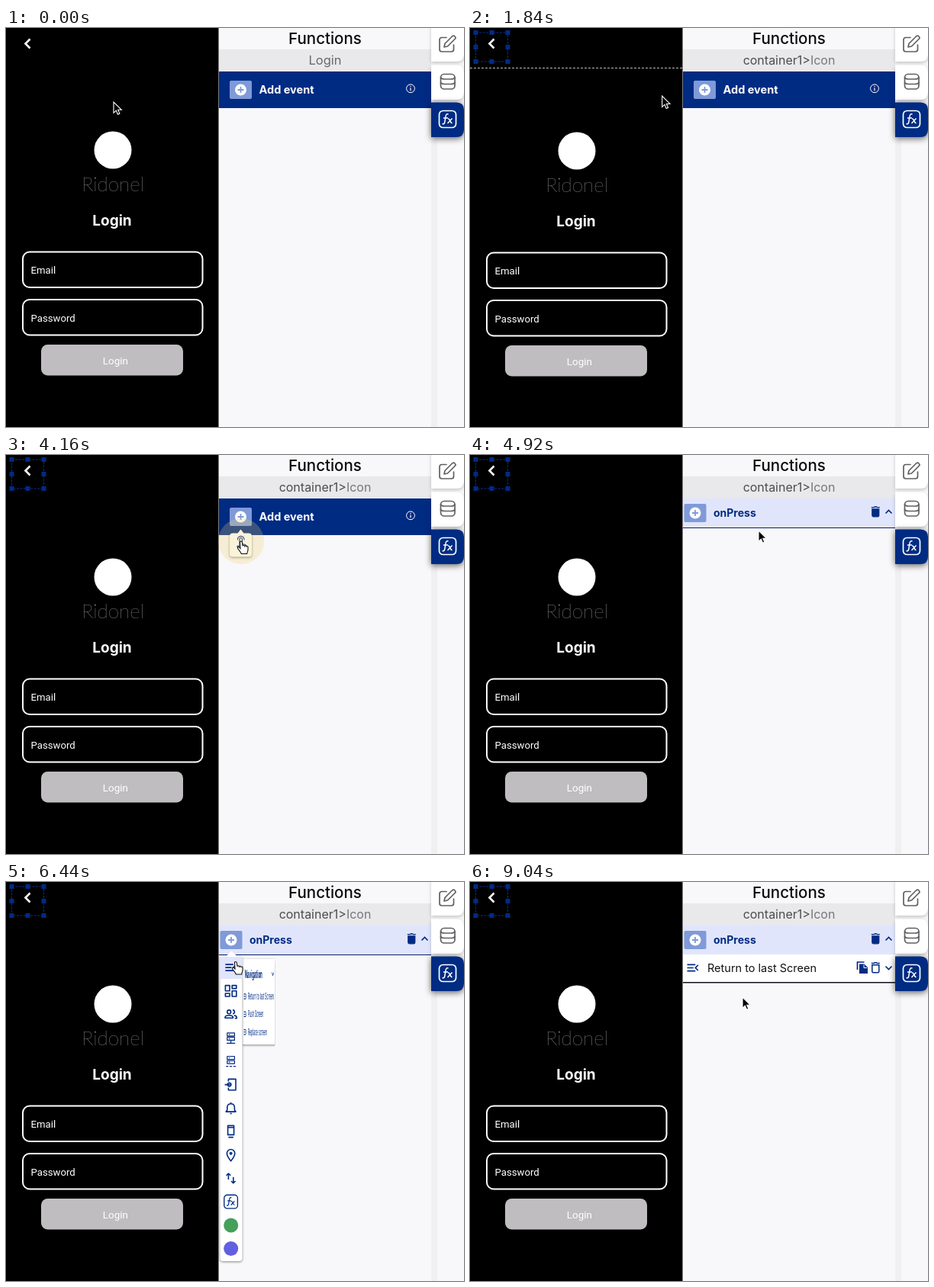
These frames come from a looping animation (600 by 523 pixels, 9800 ms). An HTML page:

```html
<!DOCTYPE html>
<html lang="en">
<head>
<meta charset="utf-8">
<title>Adding an event</title>
<style>
html, body { margin: 0; width: 100%; height: 100%; overflow: hidden; background: #f8f7f9; }
svg { display: block; }
text { font-family: Inter, "Open Sans", sans-serif; }
.app { font-family: Roboto, Arial, sans-serif; fill: #fff; }
.mid { text-anchor: middle; }
.navy { fill: #002b83; }
.line { fill: none; stroke: #002b83; stroke-width: 2; stroke-linejoin: round; }
.thin { stroke-width: 1.500; }
.chev { fill: none; stroke: #002b83; stroke-width: 1.700; }
.tab { fill: #fff; filter: drop-shadow(0 2px 2px #0003); }
.card { fill: #fff; filter: drop-shadow(0 1px 1.5px #0007); }
.tool { fill: none; stroke: #606064; stroke-width: 1.700; stroke-linejoin: round; stroke-linecap: round; }
</style>
</head>
<body>
<svg width="600" height="523" viewBox="0 0 600 523">
  <defs>
    <g id="open"><path class="navy" d="M3 18h13v-2H3v2zm0-5h10v-2H3v2zm0-7v2h13V6H3zm18 9.600L17.400 12 21 8.400 19.600 7l-5 5 5 5z"/></g>
    <g id="grid" class="line"><path d="M3 3h7v9H3zM14 3h7v5h-7zM14 12h7v9h-7zM3 16h7v5H3z"/></g>
    <g id="people" class="line"><circle cx="9" cy="8" r="3"/><path d="M2.500 18v-1c0-2 3-3.500 6.500-3.500s6.500 1.500 6.500 3.500v1zM15 5a3 3 0 0 1 0 6M17.500 13.700c2.500.5 4 1.800 4 3.300v1.500h-3"/></g>
    <g id="server" class="line thin"><path d="M6 4h12v5H6zM6 11h12v5H6zM12 16v5M5 21h14M8.500 6.500h2M8.500 13.500h2"/></g>
    <g id="query" class="line thin"><path d="M6 4h12v5H6zM6 11h12v5H6zM8.500 6.500h2M8.500 13.500h2"/><path d="M4 20.500h17" stroke-dasharray="4 2"/></g>
    <g id="exit" class="line"><path d="M8 7V3h12v18H8v-4M2 12h9"/><circle cx="9.500" cy="12" r="2.800"/></g>
    <g id="bell" class="line"><path d="M4 18h16l-2-2.500V11c0-3.500-2-6-6-6s-6 2.500-6 6v4.500zM12 5V2.500M10.500 21h3"/></g>
    <g id="phone" class="line"><path d="M7 2.500h10v15H7zM7 5.500h10M8 21.500h8"/></g>
    <g id="pin" class="line"><path d="M12 22c-4-5-6.500-8.500-6.500-12.500a6.500 6.500 0 0 1 13 0c0 4-2.500 7.500-6.500 12.500z"/><circle cx="12" cy="9.500" r="1.500"/></g>
    <g id="swap" class="line"><path d="M8 14V4M4.500 7.500L8 4l3.500 3.500M16 10v10M12.500 16.500L16 20l3.500-3.500"/></g>
    <g id="fx"><rect x="1" y="1" width="22" height="22" rx="5" fill="none" stroke="currentColor" stroke-width="1.700"/>
      <path d="M13 5.500c-2.500-1-3.200 1-3.500 3l-1.200 7c-.3 2-1.300 3.500-3.300 2.500M6.500 10.500h6M12.500 11.500c3-1 2.500 6 5.500 5.500M18 11l-6 6.500" fill="none" stroke="currentColor" stroke-width="1.500"/></g>
    <g id="plus"><rect width="29" height="24" rx="2" fill="#7f9ad8"/><circle cx="14.500" cy="12" r="7.500" fill="#fff"/><path d="M10.500 12h8M14.500 8v8" stroke="#7f9ad8" stroke-width="1.800"/></g>
    <path id="bin" d="M1 3.500h9v8.500q0 1.500-1.500 1.500h-6Q1 13.500 1 12zM0 1.300h3.500L4.300.5h2.400l.8.800H11"/>
    <path id="down" class="chev" d="M-4-2L0 2 4-2"/>
    <path id="arrow" d="M0 0V14.300L3.300 11.200 5.500 16.300 7.900 15.300 5.700 10.300H10.300Z" fill="#000" stroke="#fff" stroke-width="1.100"/>
    <path id="hand" d="M-1.500 1.200c0-1.700 2.600-1.700 2.800 0l.7 5c.3-1.300 2.300-1.200 2.500.2.500-1 2.200-.8 2.400.5.700-.8 2.100-.3 2.100 1v3.300c0 2-1.300 3-1.300 5.300H.3C-.5 13.800-3 12-4.300 9.500c-.9-1.700.8-2.600 2-1.400l1.300 1.400z" fill="#fff" stroke="#111" stroke-width="1.100"/>
  </defs>

  <rect width="600" height="523" fill="#f8f7f9"/>
  <rect x="557" y="100" width="8" height="423" fill="#f0eff2"/>

  <!-- phone preview -->
  <rect width="278.500" height="523" fill="#000"/>
  <path d="M31.500 14.500L25.500 20.500 31.500 26.500" fill="none" stroke="#fff" stroke-width="2.600"/>
  <g id="page">
    <circle cx="140" cy="160" r="24.500" fill="#fff"/>
    <text class="mid" x="140" y="214" style="font:200 26px Lato,'Open Sans',sans-serif" fill="#e4e4e4">Ridonel</text>
    <text class="mid" x="139" y="258.500" font-size="19" font-weight="700" fill="#fff">Login</text>
    <g fill="none" stroke="#fff" stroke-width="2">
      <rect x="22" y="293.500" width="235.500" height="46.500" rx="9"/>
      <rect x="22" y="356" width="235.500" height="46.500" rx="9"/>
    </g>
    <text class="app" x="32.500" y="322" font-size="13.200">Email</text>
    <text class="app" x="32.500" y="385" font-size="13.200">Password</text>
    <rect x="46" y="415" width="186" height="40.500" rx="8.500" fill="#bfbdc0"/>
    <text class="app mid" x="143.300" y="440.500" font-size="13.400">Login</text>
  </g>
  <path id="dash" d="M0 52.500H278.500" stroke="#bbb" stroke-dasharray="3 2"/>
  <g id="frame" class="navy">
    <rect x="7.500" y="6" width="42" height="38" fill="none" stroke="#0a2d8c" stroke-dasharray="3 1.500"/>
  </g>

  <!-- function panel -->
  <text class="mid" x="418" y="20.800" font-size="20.500" font-weight="500" fill="#0b0b0c">Functions</text>
  <rect x="279" y="28" width="278" height="29" fill="#e9e8ea"/>
  <text id="titleA" class="mid" x="418" y="48" font-size="16.500" fill="#69686b">Login</text>
  <text id="titleB" class="mid" x="418" y="48" font-size="16" fill="#4d4c4f">container1&gt;<tspan fill="#77767a">Icon</tspan></text>

  <g id="add">
    <rect x="279" y="57" width="278" height="48" class="navy"/>
    <use href="#plus" x="293" y="69"/>
    <text x="331.500" y="86" font-size="14.500" font-weight="700" fill="#fff">Add event</text>
    <circle cx="530" cy="79.300" r="5.400" fill="none" stroke="#fff"/>
    <path d="M530 78.500v3.800M530 76v1.300" stroke="#fff" stroke-width="1.200"/>
  </g>
  <g id="event">
    <rect x="279" y="57" width="278" height="38" fill="#e1e5fc"/>
    <use href="#plus" x="280.500" y="64"/>
    <text x="319" y="81" font-size="14" font-weight="700" class="navy">onPress</text>
    <use href="#bin" x="525.800" y="67.300" class="navy" stroke="#002b83" stroke-width="1.200"/>
    <use href="#down" transform="translate(548.500 74.500) scale(1 -1)"/>
    <path id="rule" d="M279 95.500H557" stroke="#0a2366"/>
  </g>
  <g id="action">
    <rect x="279" y="95" width="278" height="36" fill="#fff"/>
    <path d="M279 131.700H557" stroke="#10131f" stroke-width="1.600"/>
    <use href="#open" transform="translate(282 102.500) scale(.83)"/>
    <text x="311" y="118" font-size="14.500" fill="#111">Return to last Screen</text>
    <path d="M507.500 115V105h9" fill="none" stroke="#002b83" stroke-width="1.700"/>
    <path d="M510 107.500h6.500l4.500 4.500v8h-11z" class="navy"/>
    <path d="M516 108.500v4h4" fill="none" stroke="#fff"/>
    <use href="#bin" x="525.800" y="105.300" fill="none" stroke="#002b83" stroke-width="1.500"/>
    <use href="#down" x="548.500" y="112.500"/>
  </g>

  <!-- side tabs -->
  <path class="tab" d="M557-4H600V34q0 10-10 10H557z"/>
  <path class="tab" d="M557 48.500H590q10 0 10 10V84q0 10-10 10H557z"/>
  <path class="tab" d="M557 97.500H590q10 0 10 10V133q0 10-10 10H557z" style="fill:#002b83;filter:drop-shadow(0 2px 4px #0009)"/>
  <g class="tool">
    <path d="M577 12.500h-6q-3 0-3 3v12.500q0 3 3 3h12.500q3 0 3-3v-6M574 25l1-4.500 10-10q1.500-1 3 .5t.5 3l-10 10z"/>
    <rect x="569.500" y="60.500" width="18.500" height="19.500" rx="4.500"/>
    <path d="M569.500 65q1 2 5 2h8.500q4 0 5-2M569.500 71.500q1 2 5 2h8.500q4 0 5-2"/>
  </g>
  <use href="#fx" transform="translate(566.500 107.500)" color="#fff"/>

  <!-- tap choice -->
  <g id="tap">
    <path class="card" d="M297 102.500h6.500l4-5 4 5h6.500q4 0 4 4v23q0 4-4 4h-21q-4 0-4-4v-23q0-4 4-4z"/>
    <path d="M306 119v-8.500q0-2 1.700-2t1.700 2v6l4 1q1.600.5 1.300 2l-.9 6h-6.500l-4.500-5.500q1-1.700 3.200 0zM303.500 111.500a4.300 4.300 0 1 1 8.400 0" fill="none" stroke="#002b83" stroke-width="1.200"/>
  </g>

  <!-- action menu -->
  <g id="menu">
    <g id="sub">
      <rect class="card" x="309" y="101" width="139.500" height="112" rx="3"/>
      <rect id="hover" x="310" y="139.500" width="138" height="21.500" fill="#e1e5fc"/>
      <text x="319" y="126.500" font-size="14.200" font-weight="700" class="navy">Navigation</text>
      <use href="#down" x="439" y="120.500"/>
    </g>
    <rect class="card" x="280.500" y="97" width="29" height="400" rx="4"/>
    <path d="M288 97.500l7.500-7 7.500 7z" fill="#fff"/>
    <rect id="first" x="280.500" y="98" width="29" height="29" fill="#e1e5fc"/>
    <circle cx="294.700" cy="450" r="9.500" fill="#45a05a"/>
    <circle cx="294.700" cy="480.500" r="9.500" fill="#6260e0"/>
  </g>

  <circle id="halo" r="30" fill="#efcd68"/>
  <g id="cursor"><use id="shape" href="#arrow"/></g>
</svg>
<script>
const LOOP = 9800;
const NS = "http://www.w3.org/2000/svg";
const $ = id => document.getElementById(id);

function put(parent, tag, attrs, text) {
  const el = document.createElementNS(NS, tag);
  for (const key in attrs) el.setAttribute(key, attrs[key]);
  if (text) el.textContent = text;
  parent.append(el);
}

["open", "grid", "people", "server", "query", "exit", "bell", "phone", "pin", "swap", "fx"]
  .forEach((name, i) => put($("menu"), "use", {
    href: "#" + name, color: "#002b83",
    transform: `translate(285 ${102.5 + i * 30.7}) scale(.8)`
  }));

["Return to last Screen", "Push Screen", "Replace screen"].forEach((label, i) => {
  const y = 150 + i * 23.4;
  put($("sub"), "use", { href: "#open", transform: `translate(313.5 ${y - 7.5}) scale(.62)` });
  put($("sub"), "text", { x: 332.5, y: y + 4, "font-size": 11.2, class: "navy" }, label);
});

for (const x of [7.5, 28.5, 49.5])
  for (const y of [6, 25, 44])
    if (x !== 28.5 || y !== 25)
      put($("frame"), "rect", { x: x - 3, y: y - 3, width: 6, height: 6 });

// cursor stops: time, x, y
const path = [
  [0, 141, 97], [680, 26, 20], [1260, 26, 20],
  [2080, 310, 107], [2260, 310, 107], [2820, 307, 88], [3260, 307, 88],
  [3840, 308, 113], [4320, 308, 113], [4900, 378, 99], [4980, 378, 99],
  [5420, 295, 75], [5760, 295, 75], [6320, 301, 104.5], [6500, 301, 104.5],
  [7400, 357, 151], [LOOP, 357, 151]
];

// parts that switch on and off: id, from, to
const spans = [
  ["titleA", 0, 840], ["titleB", 840, LOOP], ["frame", 840, LOOP],
  ["dash", 1280, 1960], ["add", 0, 4240], ["event", 4240, LOOP],
  ["rule", 4240, 7840], ["action", 7840, LOOP], ["tap", 2900, 4240],
  ["menu", 5520, 7840], ["sub", 6360, 7840], ["first", 6200, 7840],
  ["hover", 7040, 7840]
];
const hands = [[2520, 4400], [5280, 7840]];
const clicks = [700, 2820, 4040, 5440, 7560];
const CLICK = 280;

const within = (t, a, b) => t >= a && t < b;
const ease = (t, a, b) => {
  const u = Math.min(1, Math.max(0, (t - a) / (b - a)));
  return u * u * (3 - 2 * u);
};

function cursorAt(t) {
  const i = path.findIndex(p => p[0] > t);
  const [t0, x0, y0] = path[i - 1], [t1, x1, y1] = path[i];
  const k = ease(t, t0, t1);
  return [x0 + (x1 - x0) * k, y0 + (y1 - y0) * k];
}

const scaleFrom = (el, x, y, sx, sy) =>
  el.setAttribute("transform", `translate(${x} ${y}) scale(${sx} ${sy}) translate(${-x} ${-y})`);

function draw(t) {
  for (const [id, a, b] of spans)
    $(id).style.display = within(t, a, b) ? "" : "none";

  // the hover outline pushes the page down by its own width
  $("page").setAttribute("transform", `translate(0 ${within(t, 1280, 1960) ? 1 : 0})`);
  scaleFrom($("menu"), 295, 97, 1, ease(t, 5520, 5740) * (1 - ease(t, 7610, 7850)));
  scaleFrom($("sub"), 310, 97, ease(t, 6360, 6580), 1);

  const [x, y] = cursorAt(t);
  const hand = hands.some(([a, b]) => within(t, a, b));
  $("cursor").setAttribute("transform", `translate(${x} ${y})`);
  $("shape").setAttribute("href", hand ? "#hand" : "#arrow");

  const click = clicks.find(c => within(t, c, c + CLICK));
  $("halo").setAttribute("transform", `translate(${x} ${y})`);
  $("halo").setAttribute("opacity", click === undefined ? 0 : .42 * (1 - ease(t, click, click + CLICK)));
}

const start = performance.now();
function tick() {
  draw((performance.now() - start) % LOOP);
  requestAnimationFrame(tick);
}
tick();
</script>
</body>
</html>
```
